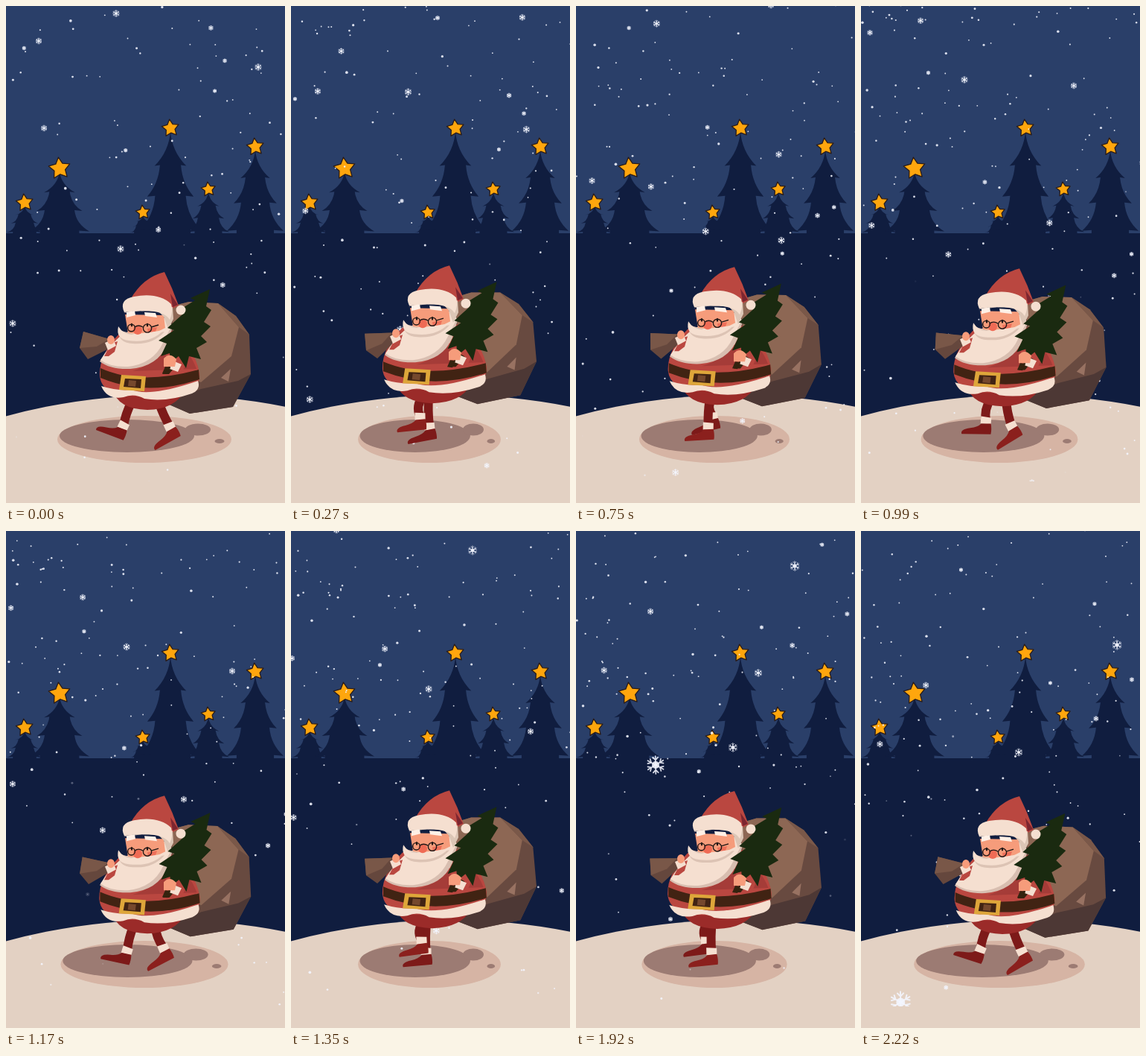
An HTML page with a canvas that plays this animation: 375x667 px, repeating every 2.25 s.

```html
<!DOCTYPE html>
<html lang="en">
<head>
<meta charset="utf-8">
<title>Winter walk</title>
<style>
html, body { margin: 0; width: 100%; height: 100%; overflow: hidden; background: #101d3f; }
svg, canvas { position: absolute; left: 0; top: 0; width: 375px; height: 667px; }
.cream { fill: #f5dfd0; }
.red { fill: #ba4740; }
.skin { fill: #f69c7b; }
.leg path { fill: none; stroke: #7d1a19; stroke-width: 12; }
</style>
</head>
<body>
<svg viewBox="0 0 375 667">
  <path fill="#2a3f69" d="M0 0H375V305H0Z"/>
  <g id="forest" fill="#101d3f"></g>
  <g id="stars" fill="#ffa60d" stroke="#2a1c18" stroke-width="1.3" stroke-linejoin="round"></g>
  <circle cx="215" cy="1347" r="825" fill="#e3d1c3"/>
  <g id="shadow">
    <ellipse cx="186" cy="581.5" rx="117" ry="31.5" fill="#d6b4a4"/>
    <g fill="#9c7b73">
      <ellipse cx="162.500" cy="577" rx="90.500" ry="22"/>
      <ellipse cx="258" cy="568.500" rx="17" ry="8"/>
      <ellipse cx="287" cy="584" rx="6.500" ry="3"/>
    </g>
  </g>
</svg>
<canvas id="snow" width="375" height="667"></canvas>
<svg viewBox="0 0 375 667">
  <g id="sack">
    <path fill="#684a40" d="M222 403L246 397 285 399 309 416 327 441 329 494 305 538 247 547 215 533Z"/>
    <path fill="#8d6754" d="M222 403L246 397 285 399 313 431 303 470 262 505 230 490Z"/>
    <path fill="#7a5849" d="M285 399L309 416 327 441 313 431Z"/>
    <path fill="#4d3835" d="M215 533L262 514 312 503 329 494 305 538 247 547Z"/>
    <path fill="#987262" d="M302 487L289 499 299 504Z"/>
  </g>
  <g id="legs"></g>
  <g id="body">
    <g id="coat">
      <path fill="#9b2b29" d="M143 514Q150 541 190 542 228 541 240 516Z"/>
      <path class="red" d="M152 440Q125 468 126 496 128 519 160 523L225 525Q262 518 260 493 255 462 226 436Z"/>
      <path fill="#a53c38" d="M205 466Q196 482 170 490L256 487Q252 476 246 468Z"/>
      <path class="cream" d="M128 510Q150 517 168 515 195 525 258 503 262 515 250 520 215 532 186 527 172 519 158 525 136 529 128 510Z"/>
      <path fill="#412313" d="M127 486Q180 510 259 488L260 501Q190 525 127 499Z"/>
      <path fill="#dea63a" d="M155 495L188 497 186 517 152 515Z"/>
      <path fill="#412313" d="M160 500L182 501 181 513 158 511Z"/>
      <path fill="#75482d" d="M165 502L175 503 174 511 164 510Z"/>
    </g>
    <g id="pouch">
      <path fill="#65473d" d="M104 437L139 447 147 453 134 462 110 474 99 459Z"/>
      <path fill="#795748" d="M104 437L139 447 122 457 99 459Z"/>
    </g>
    <path fill="#d8beb0" d="M155 442Q138 456 126 477 140 488 167 487 204 484 217 454L224 430Z"/>
    <path class="cream" d="M157 440Q140 455 127 475 140 485 164 484 198 480 211 452L223 428 212 418Z"/>
    <path class="red" d="M132 470L141 453 150 450 146 464 138 470Z"/>
    <path class="cream" d="M133 452L144 447 148 456 137 462Z"/>
    <ellipse class="skin" cx="141" cy="448" rx="5" ry="6"/>
    <path class="skin" d="M160 414L212 415 214 432 196 441 164 439Z"/>
    <path fill="#ee705a" d="M190 433L203 431 201 437 191 439Z"/>
    <path fill="#dcc3b4" d="M152 435Q150 452 170 453 198 455 213 437L180 443Z"/>
    <path class="cream" d="M175 440Q160 444 151 430 147 447 165 449 195 453 212 435 195 438 175 440Z"/>
    <ellipse cx="177" cy="435" rx="6" ry="6" fill="#ef6b55"/>
    <g fill="none" stroke="#201716" stroke-width="1.4">
      <circle cx="168.500" cy="432" r="4.800"/><circle cx="190" cy="432.500" r="5.600"/>
      <path d="M173 431Q178 427 184 431M195 431L205 428"/>
    </g>
    <g fill="#201716"><ellipse cx="169" cy="428" rx="1.200" ry="2.500"/><ellipse cx="190" cy="428" rx="1.200" ry="2.500"/></g>
    <path class="red" d="M167 394Q184 364 213 357 224 379 232 402L222 407Z"/>
    <path fill="#7c2630" d="M221 386L231 401 224 404Z"/>
    <path fill="#dcc6b6" d="M158 412Q170 407 205 410L212 417 218 434 225 420 224 404Z"/>
    <path class="cream" d="M159 411Q151 394 172 390 205 384 222 400 225 410 220 421 210 404 159 411Z"/>
    <path fill="#fff0e6" d="M162 411L173 409 174 415 162 418ZM186 411L201 412 203 418 187 416Z"/>
    <path class="red" d="M212 462Q230 452 246 470L238 489 221 484Z"/>
    <g id="fir">
      <path fill="#35230f" d="M224 476L231 480 219 494 210 494Z"/>
      <path fill="#1a2a10" d="M274 380L248 392 254 395 231 409 237 414 217 432 226 435 205 449 216 453 208 470 220 466 221 479 232 470 242 486 246 470 262 474 256 459 270 451 262 443 275 430 266 424 276 408 269 403Z"/>
    </g>
    <path class="cream" d="M224 476L236 481 231 491 220 487Z"/>
    <path class="skin" d="M212 473Q220 464 229 474L227 484 212 484Z"/>
    <path fill="#35230f" d="M214 484L221 485 217 494 210 493Z"/>
    <circle class="cream" cx="235" cy="408" r="6.500"/>
  </g>
</svg>
<script>
const LOOP = 2250, GAIT = 1125, STEP = 30;
const $ = id => document.getElementById(id);
const add = (box, html) => $(box).insertAdjacentHTML('beforeend', html);

// Scenery
function fir(x, top, w) {
  const h = 305 - top;
  const tiers = [[.34, .52], [.64, .76], [.97, 1]];
  const side = s => {
    let d = '', y = top, reach = 0;
    for (const [fy, fw] of tiers) {
      const ty = top + h * fy, tx = w * fw;
      d += `Q${x + s * (reach + 2)} ${(y + ty) / 2 + 4} ${x + s * tx} ${ty}`;
      reach = tx * .66;
      y = ty - 1;
      d += `L${x + s * reach} ${y}`;
    }
    return d;
  };
  add('forest', `<path d="M${x} ${top}${side(1)}V306H${x}Z"/><path d="M${x} ${top}${side(-1)}V306H${x}Z"/>`);
}

function star(x, y, r) {
  const pts = Array.from({ length: 10 }, (_, i) => {
    const a = i * Math.PI / 5 - 1.68, q = i % 2 ? r * .52 : r;
    return (x + q * Math.cos(a)).toFixed(1) + ',' + (y + q * Math.sin(a)).toFixed(1);
  });
  add('stars', `<polygon points="${pts.join(' ')}"/>`);
}

[[25, 263, 12, 24], [72, 217, 15, 40], [184, 276, 10, 18],
 [221, 163, 12, 41], [272, 245, 10, 28], [335, 188, 12, 38]].forEach(([x, y, r, w]) => {
  fir(x, y + 5, w);
  star(x, y + 1, r);
});

// Walk cycle: rows of time and values, repeating every GAIT
const BOB = [[0, 0], [120, .55], [225, .98], [300, .98], [400, .66], [510, .22],
  [565, .06], [680, .5], [795, .9], [860, .88], [990, .54], [1095, .1]];
// time, ankle x, ankle y, foot angle
const ANKLE = [[0, 158, 563, 25], [110, 170, 563, 5], [230, 182, 564, -1], [427, 202, 563, -27],
  [562, 220, 564, -25], [680, 198, 552, -20], [790, 175, 549, -3], [990, 168, 556, 5], [1072, 163, 560, 20]];

function sample(rows, t) {
  t %= GAIT;
  let i = rows.length - 1;
  while (rows[i][0] > t) i--;
  const a = rows[i], b = rows[(i + 1) % rows.length];
  const k = (t - a[0]) / ((b[0] || GAIT) - a[0]);
  return a.slice(1).map((v, j) => v + (b[j + 1] - v) * k);
}

const legs = ['#7d1a19', '#8b201d'].map(tone => {
  add('legs', `<g class="leg"><path/><g><polygon class="cream" points="-7,-5 7,-4 7,5 -7,5"/>
    <path style="fill:${tone};stroke:none" d="M-6 5L7 4Q9 12 8 18L-31 21Q-34 15-20 12-10 10-6 5Z"/></g></g>`);
  const g = $('legs').lastElementChild;
  return { limb: g.firstElementChild, foot: g.lastElementChild };
});

function poseLeg({ limb, foot }, t, lift) {
  const [x, y, a] = sample(ANKLE, t);
  const hip = 187 + (x - 189) * .6, top = 532 - lift;
  const knee = (hip + x) / 2 - (564 - y) * .5 - 2;
  limb.setAttribute('d', `M${hip} ${top}Q${knee} ${(top + y) / 2} ${x} ${y}`);
  foot.setAttribute('transform', `translate(${x} ${y}) rotate(${a})`);
}

function walk(t) {
  const [b] = sample(BOB, t), lift = 9 * b;
  const put = (id, v) => $(id).setAttribute('transform', v);
  put('shadow', `translate(186 0) scale(${1 - .184 * b} 1) translate(-186 0)`);
  put('body', `translate(0 ${-lift})`);
  put('coat', `translate(195 0) scale(${1 + .045 * b} 1) translate(-195 0)`);
  put('sack', `translate(0 ${-lift}) rotate(${-3 * b} 170 470)`);
  put('pouch', `translate(${-3 * b} 0) rotate(${-18 * b} 140 449)`);
  put('fir', `translate(${2.5 * b} ${-b})`);
  poseLeg(legs[0], t, lift);
  poseLeg(legs[1], t + GAIT / 2, lift);
}

// Snow
let seed = 2412;
const rand = () => {
  seed = (seed * 16807) % 2147483647;
  return seed / 2147483647;
};
const flakes = Array.from({ length: 310 }, () => {
  const r = rand(), d = 2.1 + 2 * r * r + 4 * r ** 20;
  const life = 1400 + 2400 * rand();
  const vy = .06 + .04 * d + .05 * rand();
  return { d, life, vy, vx: vy * (rand() - .5) * .7, x: rand() * 415 - 20, y: -6,
    born: rand() * (LOOP + life) - life, a: 0 };
});
// Near flakes: time, x, y, vx, vy, size, acceleration
[[0, 148, 10, .035, .39, 9], [0, 44, 47, -.03, .25, 8], [0, 339, 82, -.084, .31, 9],
 [0, 154, 326, -.027, .4, 9], [0, 9, 426, .06, .378, 9], [990, 139, 99, .128, .314, 9],
 [990, 286, 107, .1, .45, 8], [1350, 244, 26, -.058, .464, 12], [1620, 278, 84, -.11, .355, 10],
 [1620, 50, 88, -.041, .33, 8], [1620, 113, 9, -.043, .33, 8], [1920, 294, 47, .167, .353, 13],
 [1920, 107, 314, -.148, .877, 24, .0007]].forEach(([born, x, y, vx, vy, d, a = 0]) =>
  flakes.push({ born, x, y, vx, vy, d, a, life: Infinity }));

const ctx = $('snow').getContext('2d');
ctx.beginPath();
ctx.rect(0, 0, 375, 638);
ctx.clip();
ctx.fillStyle = ctx.strokeStyle = '#f4f6ff';
ctx.lineCap = 'round';

function drawFlake(x, y, d) {
  const r = d / 2;
  ctx.beginPath();
  if (d < 4.5) {
    ctx.arc(x, y, r * .85, 0, 7);
    ctx.fill();
    return;
  }
  ctx.lineWidth = Math.max(.9, d * .07);
  for (let i = 0; i < 6; i++) {
    const a = i * Math.PI / 3 + .5;
    const at = (q, turn) => [x + r * q * Math.cos(a + turn), y + r * q * Math.sin(a + turn)];
    ctx.moveTo(x, y);
    ctx.lineTo(...at(1, 0));
    ctx.moveTo(...at(.9, .32));
    ctx.lineTo(...at(.55, 0));
    ctx.lineTo(...at(.9, -.32));
  }
  ctx.stroke();
  ctx.beginPath();
  ctx.arc(x, y, r * .42, 0, 7);
  ctx.fill();
}

function snow(t) {
  ctx.clearRect(0, 0, 375, 667);
  for (const f of flakes) {
    const age = t - f.born;
    if (f.life < Infinity && (age < 0 || age > f.life)) continue;
    const s = age + f.a * age * age;
    if (f.a && age < -500) continue;
    ctx.globalAlpha = .88 * Math.min(1, (f.life - age) / 200);
    drawFlake(f.x + f.vx * s, f.y + f.vy * s, f.d * (1 + f.a * age * .8));
  }
}

let start;
function tick(now) {
  start ??= now;
  const t = Math.floor((now - start) % LOOP / STEP) * STEP;
  walk(t);
  snow(t);
  requestAnimationFrame(tick);
}
walk(0);
snow(0);
requestAnimationFrame(tick);
</script>
</body>
</html>
```
